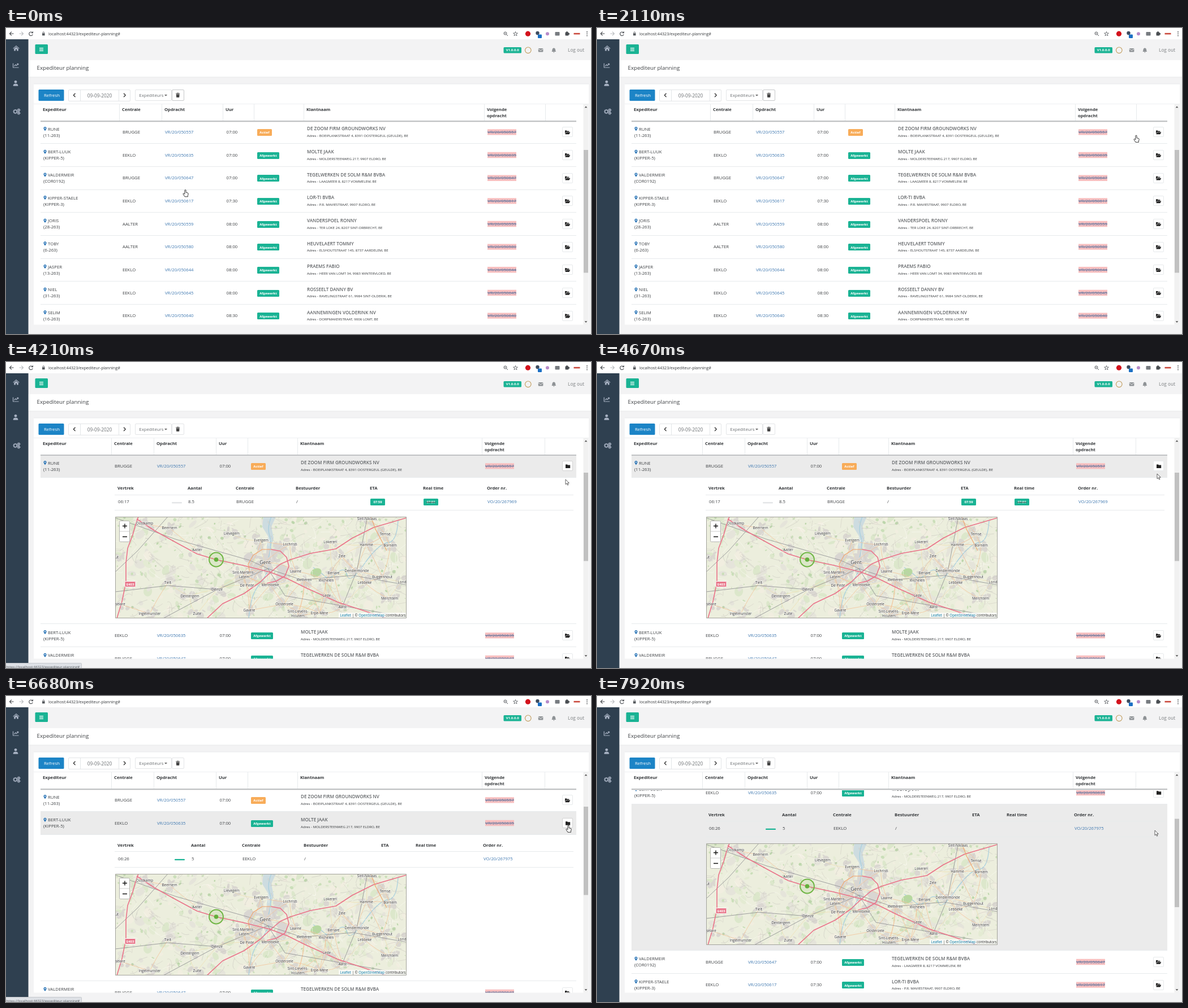
Write an HTML page with a canvas that moves like this. It is 1034x542 px and loops after 8 s.

```html
<!DOCTYPE html>
<html lang="nl">
<head>
<meta charset="utf-8">
<title>Expediteur planning</title>
<style>
html, body { margin: 0; width: 100%; height: 100%; overflow: hidden; background: #f3f3f4; }
canvas { display: block; }
</style>
</head>
<body>
<canvas id="stage" width="1034" height="542"></canvas>
<script>
const LOOP = 8000, PITCH = 40.65, DETAIL = 259.3;
const TEAL = '#1ab394', LINK = '#3f78b0', INK = '#3f4245', LINE = '#e7eaec', HOVER = '#ebebeb';
const stage = document.getElementById('stage').getContext('2d');
let g = stage;

// ---- drawing helpers ----
function rect(x, y, w, h, fill, stroke, r = 0) {
  g.beginPath();
  g.roundRect(x, y, w, h, r);
  if (fill) { g.fillStyle = fill; g.fill(); }
  if (stroke) { g.strokeStyle = stroke; g.lineWidth = 1; g.stroke(); }
}
function circle(x, y, r, fill, stroke, width = 1) {
  g.beginPath();
  g.arc(x, y, r, 0, 7);
  if (fill) { g.fillStyle = fill; g.fill(); }
  if (stroke) { g.strokeStyle = stroke; g.lineWidth = width; g.stroke(); }
}
function shape(d, x, y, fill, stroke, width = 1) {
  const p = new Path2D(d);
  g.save();
  g.translate(x, y);
  g.lineJoin = 'round';
  if (fill) { g.fillStyle = fill; g.fill(p, 'evenodd'); }
  if (stroke) { g.strokeStyle = stroke; g.lineWidth = width; g.stroke(p); }
  g.restore();
}
// cy is the middle of the capitals
function text(s, x, cy, size = 7.75, color = INK, weight = 400, align = 'left') {
  g.font = `${weight} ${size}px "Open Sans", "Noto Sans", sans-serif`;
  g.textAlign = align;
  g.fillStyle = color;
  g.fillText(s, x, cy + size * .357);
  return g.measureText(s).width;
}
function badge(s, x, cy, w, color, struck) {
  rect(x, Math.round(cy - 6), w, 12, color, null, 1.5);
  text(s, x + w / 2, cy + .2, 5.95, '#fff', 700, 'center');
  if (struck) rect(x + 5, Math.round(cy), w - 10, 1, '#2c4a44');
}

// ---- timing helpers ----
const at = (t, keys) => keys.filter(k => k[0] <= t).pop()[1];
// moves: [start, end, steps, points]; each runs in equal steps along its points
function track(t, moves) {
  let pos = moves[0][3][0];
  for (const [start, end, steps, pts] of moves) {
    if (t < start) break;
    const step = steps > 1 ? Math.floor((t - start) / (end - start) * (steps - 1) + .001) + 1 : 1;
    const u = Math.min(1, step / steps) * (pts.length - 1);
    const i = Math.min(pts.length - 2, Math.floor(u));
    pos = pts[i].map((v, n) => v + (pts[i + 1][n] - v) * (u - i));
  }
  return pos;
}

// ---- content ----
const rows = [
  ['RUNE', '11-263', 'BRUGGE', '050557', '07:00', 'DE ZOOM FIRM GROUNDWORKS NV', 'BOEIPLANKSTRAAT 4, 8391 OOSTERGEUL (GEULDE)'],
  ['BERT-LUUK', 'KIPPER-5', 'EEKLO', '050635', '07:00', 'MOLTE JAAK', 'MOLDERSTEENWEG 217, 9907 ELDRO'],
  ['VALDERMEIR', 'COR0192', 'BRUGGE', '050647', '07:00', 'TEGELWERKEN DE SOLM R&M BVBA', 'LAAGMEER 8, 8217 VOMMELEM'],
  ['KIPPER-STAELE', 'KIPPER-3', 'EEKLO', '050617', '07:30', 'LOR-TI BVBA', 'P.R. MAVIESTRAAT, 9907 ELDRO'],
  ['JORIS', '28-263', 'AALTER', '050559', '08:00', 'VANDERSPOEL RONNY', 'TER LOKE 24, 8207 SINT-ORBRECHT'],
  ['TOBY', '6-263', 'AALTER', '050580', '08:00', 'HEUVELAERT TOMMY', 'ELSHOUTSTRAAT 145, 8737 AARDELEM'],
  ['JASPER', '13-263', 'EEKLO', '050644', '08:00', 'PRAEMS FABIO', 'HEER VAN LOMT 34, 9983 WINTERVLOED'],
  ['NIEL', '31-263', 'EEKLO', '050645', '08:00', 'ROSSEELT DANNY BV', 'RAVELINGSTRAAT 61, 9984 SINT-OLDERIK'],
  ['SELIM', '16-263', 'EEKLO', '050640', '08:30', 'AANNEMINGEN VOLDERINK NV', 'DORPMAKERSTRAAT, 9006 LOMT']
];
const heads = ['Expediteur', 'Centrale', 'Opdracht', 'Uur', '', 'Klantnaam', 'Volgende', ''];
const wide = [65, 205, 280, 388, 443, 531, 850, 958];
const narrow = [65, 191, 266, 376, 432, 520, 846, 957];
const detailHeads = ['Vertrek', 'Aantal', 'Centrale', 'Bestuurder', 'ETA', 'Real time', 'Order nr.'];
const details = [
  { x: [197, 321, 406, 512, 643, 737, 850], bar: [293, '#e4e6e8'],
    values: ['06:17', '8.5', 'BRUGGE', '/', '07:59', '07:59', 'VO/20/267969'] },
  { x: [197, 327, 417, 526, 663, 724, 843], bar: [298, TEAL],
    values: ['06:26', '5', 'EEKLO', '/', '', '', 'VO/20/267975'] }
];
const towns = [
  ['Oostkamp', 52, 12], ['Beernem', 96, 20], ['Lievegem', 206, 30], ['Evergem', 258, 42],
  ['Lochristi', 309, 49], ['Lokeren', 380, 45], ['Sint-Niklaas', 445, 4], ['Temse', 477, 31],
  ['Hamme', 444, 50], ['Bornem', 486, 51], ['Aalter', 145, 59], ['Gent', 265, 81],
  ['Zele', 401, 70], ['Dendermonde', 427, 96], ['Sint-Martens-', 227, 99], ['Latem', 228, 107],
  ['Laarne', 319, 97], ['Berlare', 386, 100], ['Wetteren', 334, 112], ['Wichelen', 373, 113],
  ['Lebbeke', 441, 117], ['Buggenhout', 472, 107], ['Tielt', 93, 117], ['Deinze', 180, 129],
  ['De Pinte', 233, 122], ['Merelbeke', 274, 121], ['Dentergem', 132, 141], ['Lede', 374, 140],
  ['Merchtem', 485, 145], ['Oosterzele', 299, 155], ['Gavere', 237, 166], ['Zulte', 145, 172],
  ['Ingelmunster', 61, 172], ['Sint-Lievens-', 323, 168], ['Houtem', 323, 176],
  ['Erpe-Mere', 361, 171], ['Aalst', 402, 160], ['selare', 9, 155], ['ut', 3, 72], ['Lond', 507, 116]
];

function makeMap() {
  const c = document.createElement('canvas');
  c.width = 515; c.height = 180;
  g = c.getContext('2d');
  let seed = 11;
  const rnd = n => (seed = seed * 16807 % 2147483647) / 2147483647 * n;
  const blob = (x, y, r, color) => {
    g.fillStyle = color;
    g.beginPath();
    g.ellipse(x, y, r, r * (.35 + rnd(.6)), rnd(3), 0, 7);
    g.fill();
  };
  rect(0, 0, 515, 180, '#eceedd');
  for (let i = 0; i < 300; i++)
    blob(rnd(515), rnd(180), 2 + rnd(8), ['#e4ebd3', '#f1eee0', '#dce7cb', '#e5e4da'][i % 4]);
  for (let i = 0; i < 220; i++) blob(rnd(515), rnd(180), .8 + rnd(2.4), i % 3 ? '#cbdfba' : '#bdd6ac');
  for (const [, x, y] of towns)
    for (let i = 0; i < 8; i++) blob(x + rnd(26) - 13, y + rnd(18) - 9, 1.5 + rnd(5), '#dad7d1');
  for (let i = 0; i < 34; i++) blob(265 + rnd(60) - 30, 78 + rnd(60) - 30, 3 + rnd(8), '#d9d6d2');
  shape('M262 0h22l-8 18 4 20-6 18h-6l2-22-10-16z', 0, 0, '#cddce0');
  shape('M276 0q-8 20-3 34t-2 38M350 90q12 7 20 15t22-5 18 4 30-20 42-38 18-40M272 90q-8 20-20 34t-16 56',
    0, 0, null, '#a9d0df', 1.3);
  blob(355, 99, 10, '#b7d8a0');
  for (let i = 0; i < 420; i++) {
    const x = rnd(515), y = rnd(180);
    shape(`M${x} ${y}q${rnd(20) - 10} ${rnd(16) - 8} ${rnd(50) - 25} ${rnd(40) - 20}`, 0, 0, null,
      ['#fbfbf5', '#cfcbc2', '#c6c4be'][i % 3], .55);
  }
  towns.forEach(([, x, y], i) => towns.slice(i + 1).forEach(([, u, v]) => {
    if (Math.hypot(u - x, v - y) < 66)
      shape(`M${x} ${y}Q${(x + u) / 2 + rnd(16) - 8} ${(y + v) / 2 + rnd(16) - 8} ${u} ${v}`, 0, 0, null,
        rnd(1) < .55 ? '#f3c49a' : '#efe0b4', .8);
  }));
  shape('M0 2L107 40 237 77 270 92 330 112 420 104 515 121M270 92L180 129 85 180M270 92L300 140 402 158 515 178'
    + 'M93 0L40 60 0 98M0 133L93 122 180 129M402 158L427 96 445 4', 0, 0, null, '#8a8b8e', .8);
  shape('M41 0L36 14 31 32 22 56 19 82 19 116 12 150 3 180M38 4L70 25 108 46 145 66 178 76 225 86 273 98 305 110'
    + ' 337 126 395 152 450 170 480 180M162 180L190 154 228 136 256 116 273 100 292 84 310 76 345 65 390 57 419 38'
    + ' 457 19 515 2M276 58L292 61 303 72 307 88 300 105 285 114 268 118', 0, 0, null, '#ea7389', 1.6);
  shape('M238 100L235 84 244 68 260 58 276 58M452 0L460 22 480 60', 0, 0, null, '#f0a46c', 1.1);
  rect(17, 114.5, 19, 10, '#e8788b', '#fff', 1);
  text('E403', 26.5, 119.5, 6, '#fff', 700, 'center');
  g.strokeStyle = '#ffffffb0';
  g.lineWidth = 1.5;
  for (const [name, x, y] of towns) {
    const size = name === 'Gent' ? 8.6 : 6.3;
    g.font = `400 ${size}px "Open Sans", "Noto Sans", sans-serif`;
    g.textAlign = 'center';
    g.strokeText(name, x, y + size * .357);
    text(name, x, y, size, '#333', 400, 'center');
  }
  circle(178.5, 76, 12.4, '#7fc25026', '#6fb544', 2);
  circle(178.5, 76, 3.8, '#62b03a');
  rect(7.5, 7.5, 18, 37, '#fff', '#b5b5b0', 2);
  rect(8, 25.5, 17, 1, '#ccc');
  shape('M13 16.5h8M17 12.5v8M13 35.5h8', 0, 0, null, '#111', 1.4);
  rect(395, 170, 120, 10, '#ffffffb8');
  let x = 397.5;
  x += text('Leaflet', x, 175, 6.2, '#0078a8');
  x += text(' | © ', x, 175, 6.2, '#333');
  x += text('OpenStreetMap', x, 175, 6.2, '#0078a8');
  text(' contributors', x, 175, 6.2, '#333');
  rect(.5, .5, 514, 179, null, '#a3a39c');
  g = stage;
  return c;
}
const map = makeMap();

// ---- page parts ----
function browserBar() {
  rect(0, 0, 1034, 20, '#fff');
  shape('M7 0H0M3.3-3.3L0 0 3.3 3.3', 6.5, 10, null, '#45494d', 1.1);
  shape('M0 0h7M3.7-3.3L7 0 3.7 3.3', 23.5, 10, null, '#b9bcbf', 1.1);
  shape('M2.5-2.2A3.3 3.3 0 1 0 3.2 1M3.4-4v2.5H.9', 44, 10.3, null, '#45494d', 1.1);
  rect(64, 9.3, 4.6, 4, '#55595d');
  shape('M0 0v-1.4a1.3 1.3 0 0 1 2.6 0V0', 65, 9.5, null, '#55595d', .8);
  text('localhost:44323/expediteur-planning#', 75, 10.4, 7.15, '#35383b');
  circle(882.5, 9.5, 2.5, null, '#55595d');
  shape('M0 0l2.5 2.5M-3-2h2', 884.5, 11.5, null, '#55595d');
  shape('M0-4L1-1.2H4L1.6.6 2.5 3.5 0 1.8-2.5 3.5-1.6.6-4-1.2H-1z', 900.5, 10.3, null, '#55595d', .8);
  circle(922.5, 10.2, 4.6, '#d3121c');
  circle(939.5, 9, 3.2, '#3f4c5e');
  rect(940, 11.5, 7, 6.5, '#1b6fc4', null, 1);
  circle(957, 10.2, 3, '#b78bc9');
  rect(970.5, 7, 8, 6.5, '#777b80', null, 1);
  rect(988.5, 7.5, 6, 6, '#4a4e52', null, 1);
  circle(991.5, 7.4, 1.3, '#4a4e52');
  circle(994.9, 10.4, 1.3, '#4a4e52');
  rect(1003.5, 8.8, 11, 2.6, '#c9483c');
  for (const y of [7, 10.3, 13.6]) circle(1027, y, .9, '#45494d');
}
function sidebar() {
  const c = '#a7b1c2';
  rect(0, 20, 39.5, 522, '#2f4050');
  shape('M0-5L5.8 0 5 .8 0-3.5-5 .8-5.8 0zM-3.8.8L0-2.4 3.8.8V4.5H1V1.7H-1V4.5H-3.8z', 18, 36, c);
  shape('M0 0V7.5H10M2 5L4.3 2.5 6 4 9 1M6.8.8H9.2V3', 12.5, 62.5, null, c, 1.2);
  circle(17, 95.3, 2.4, c);
  shape('M-4.2 4.8V3.3Q-4 .8-1.5.8h3Q4 .8 4.2 3.3V4.8z', 17, 98, c);
  for (const [x, y, r] of [[16.5, 148, 2.6], [22.5, 145.3, 1.4], [22.5, 150.7, 1.4]]) {
    g.setLineDash([1.1, .95]);
    circle(x, y, r + .9, null, c, 1.3);
    g.setLineDash([]);
    circle(x, y, r, null, c, 1.4);
  }
}
function topBar() {
  rect(51.5, 29, 22.5, 17, TEAL, null, 1.5);
  for (const y of [35, 37.4, 39.8]) rect(59, y, 7, 1.1, '#fff');
  rect(879.5, 34, 31.5, 10.5, TEAL, null, 1.5);
  text('V1.0.0.0', 895.2, 39.3, 6, '#fff', 700, 'center');
  circle(922.8, 39.3, 5.3, null, '#c09a58', 1.1);
  rect(940.8, 36, 8.6, 6.6, '#8f9396', null, 1);
  shape('M0 0l4.3 3L8.6 0', 940.8, 37, null, '#f3f3f4', .9);
  shape('M-4 3Q-2.8 2-2.8-.8-2.6-3.5 0-3.8 2.6-3.5 2.8-.8 2.8 2 4 3zM-1.2 3.6h2.4Q1 4.8 0 4.8T-1.2 3.6z', 968.3, 39, '#8f9396');
  text('Log out', 993, 39.2, 8.1, '#999c9e', 600);
  rect(39.5, 57, 995, 30, '#fff');
  rect(39.5, 86.5, 995, 1, LINE);
  text('Expediteur planning', 54.5, 70.5, 9.8, INK);
}
function toolbar(t) {
  const edge = '#e3e5e7', chevron = (d, x) => shape(d, x, 119, null, '#333', 1.3);
  rect(57.5, 109, 45, 20, '#1c84c6', null, 1.5);
  text('Refresh', 81, 119, 7.9, '#fff', 500, 'center');
  rect(110.5, 109.5, 109, 20, '#fff', edge, 1.5);
  rect(131, 109.5, 1, 20, edge);
  rect(199, 109.5, 1, 20, edge);
  chevron('M2-3.2L-1.2 0 2 3.2', 120.5);
  chevron('M-1.5-3.2L1.7 0-1.5 3.2', 209.5);
  text('09-09-2020', 165.5, 120.3, 8.3, '#6c7073', 400, 'center');
  rect(228.5, 109.5, 64, 19, '#fff', edge, 1.5);
  text('Expediteurs', 235.3, 119, 7.8, '#6c7073');
  shape('M0 0h5L2.5 2.7z', 280, 118, '#666');
  rect(293.5, 109.5, 21, 19, '#fff', t < 3140 ? '#c6c8ca' : edge, 1.5);
  shape('M0 .8h2L2.5 0h2L5 .8h2v1H0zM.5 2.5h6L6 8.2H1z', 300.2, 114.7, '#444');
}
function folder(cy, closed, hot) {
  rect(983.5, Math.round(cy) - 8.5, 18, 17, '#fff', hot ? '#d2d2d2' : LINE, 1.5);
  if (closed) shape('M0 .5h3l1 1h4.2V7H0z', 989, cy - 3.4, '#222');
  else shape('M0 0h2.8l1 1h3.6v1.6H2L0 6zM2.3 3.2H9.3L7.4 6.8H.3z', 988, cy - 3, '#222');
}
function drawRow(r, i, cy, cols, s) {
  const [name, code, depot, order, hour, client, address] = r;
  if (s.hover === i && !s.onDetail) rect(61, cy - 20, 947, PITCH, HOVER);
  rect(61, Math.round(cy + 20), 947, 1, LINE);
  shape('M2.5 7.3C.8 5 0 4 0 2.5a2.5 2.5 0 0 1 5 0C5 4 4.2 5 2.5 7.3zM2.5 1.5a1 1 0 1 0 .01 0z', 66.5, cy - 9.3, '#2672b5');
  text(name, 74, cy - 5.4);
  text(`(${code})`, 66, cy + 5.6);
  text(depot, cols[1] + 1, cy);
  text('VR/20/' + order, cols[2] + 1, cy, 7.75, LINK);
  text(hour, cols[3] + 1.5, cy);
  if (i) badge('Afgewerkt', cols[4] + 1, cy + .6, 39, TEAL);
  else badge('Actief', cols[4] + 1, cy + .6, 26, '#f8ac59');
  text(client, cols[5] + 1, cy - 5.8, 8.1, '#606366', 600);
  text(`Adres - ${address}, BE`, cols[5] + 1, cy + 6.3, 6.18, '#333639');
  const x = cols[6] + 1;
  rect(x, cy - 5.2, 51, 10.4, '#f8bfbf');
  text('VR/20/' + order, x + .3, cy, 7.75, '#6f86ac');
  rect(x, cy - .4, 51, 1, '#5a6f98');
  folder(cy, s.open === i, s.status && s.hover === i);
}
function drawDetail(d, cy, lit) {
  if (lit) rect(61, cy + 20, 947, DETAIL, HOVER);
  detailHeads.forEach((h, n) => {
    const x = d.x[n], v = d.values[n], y = cy + 63.3;
    text(h, x, cy + 38.8, 7.7, '#333639', 700);
    if (v && (n === 4 || n === 5)) badge(v, x + 1, y + .3, 26, TEAL, n === 5);
    else text(v, x + 1, y, 7.75, n === 6 ? LINK : INK);
  });
  rect(d.bar[0], cy + 63.6, 18, 2.4, d.bar[1], null, 1);
  for (const y of [50.3, 77.5]) rect(192, Math.round(cy + y), 811, 1, LINE);
  g.drawImage(map, 193, Math.round(cy + 89.6));
  rect(61, Math.round(cy + 19.5 + DETAIL), 947, 1, LINE);
}
function table(s) {
  const cols = s.open < 0 ? wide : narrow;
  g.save();
  g.beginPath();
  g.rect(49, 164, 972, 361.5);
  g.clip();
  rows.forEach((r, i) => {
    const shift = s.open >= 0 && i > s.open ? DETAIL : 0;
    const cy = 184.4 + i * PITCH + shift - s.scroll;
    if (cy > 560) return;
    if (i === s.open) drawDetail(details[i], cy, s.onDetail);
    drawRow(r, i, cy, cols, s);
  });
  g.restore();
  rect(49, 134, 972, 30.5, '#fff');
  rect(49, 134, 981, .8, LINE);
  heads.forEach((h, n) => {
    text(h, cols[n], 144.3, 7.7, '#333639', 700);
    if (n) rect(cols[n] - 5, 135, 1, 30, LINE);
  });
  text('opdracht', cols[6], 155.2, 7.7, '#333639', 700);
  rect(61, 164, 947, 2, '#c0c2c4');
  rect(61, 166, 947, 1, '#ebebeb');
}
function scrollbar(s) {
  rect(1020.5, 134.5, 9, 391, '#f1f1f1');
  if (s.open < 0) rect(1021, 216, 8, 217.5, '#c1c1c1');
  else rect(1021, 196 + s.scroll * .4, 8, 156.5, '#c1c1c1');
  shape('M-2.3 1.2L0-1.4 2.3 1.2z', 1025, 140, '#505050');
  shape('M-2.3-1.2L0 1.4 2.3-1.2z', 1025, 520.5, '#505050');
}
function statusBar() {
  rect(-1, 533.5, 134.5, 10, '#dee1e6', '#c5c8cc', 1);
  text('https://localhost:44323/expediteur-planning#', .5, 540.3, 6.14, '#5a5e63');
}

// ---- motion ----
const pointerMoves = [
  [70, 500, 7, [[317, 286.5], [262, 200], [188, 138]]],
  [640, 1410, 11, [[188, 138], [177, 108], [204, 56], [252, 72], [227, 105]]],
  [1480, 1960, 7, [[227, 105], [886, 186.5]]],
  [2110, 2110, 1, [[886, 186.5], [953, 190]]],
  [2190, 2740, 8, [[953, 190], [1015, 189], [998, 190]]],
  [4130, 4210, 2, [[998, 190], [989, 208]]],
  [4290, 4590, 4, [[989, 208], [987, 221], [990, 203]]],
  [4670, 4670, 1, [[990, 203], [990, 198]]],
  [4750, 4900, 3, [[990, 198], [991, 200]]],
  [5020, 5290, 4, [[991, 200], [992, 190]]],
  [5670, 5900, 4, [[992, 190], [993, 216]]],
  [6060, 6280, 4, [[993, 216], [994, 229]]],
  [7290, 7600, 5, [[994, 229], [985, 244]]],
  [7750, 7920, 3, [[985, 244], [986, 238]]]
];
const scrollMoves = [[7290, 7520, 4, [[0], [24], [42], [51], [54]]]];

function stateAt(t) {
  return {
    open: at(t, [[0, -1], [3580, 0], [5440, -1], [6680, 1]]),
    hover: at(t, [[0, -1], [3140, 0], [5750, 1]]),
    onDetail: at(t, [[0, false], [4290, true], [4590, false], [7600, true]]),
    status: at(t, [[0, false], [3140, true], [4290, false], [5110, true], [6060, false], [6210, true], [7750, false]]),
    hand: at(t, [[0, true], [390, false], [1720, true], [3980, false], [5110, true], [7600, false]]),
    scroll: track(t, scrollMoves)[0]
  };
}
function pointer(t, hand) {
  const [x, y] = track(t, pointerMoves);
  const d = hand
    ? 'M-1.1 1.2a1.1 1.1 0 0 1 2.2 0v3.6l3 .7q1.2.4 1.1 2L4.4 10.2V12.3H-1L-4 7.6q0-1.6 1.5-1l1.4 1.2z'
    : 'M0 0v8.8l2-1.9 1.5 3.2 1.5-.6-1.5-3.2h2.8z';
  shape(d, x, y, '#fff', '#222', hand ? .9 : .7);
}
function frame(now) {
  const t = now % LOOP, s = stateAt(t);
  rect(0, 0, 1034, 542, '#f3f3f4');
  browserBar();
  topBar();
  rect(49, 99, 981, 426.5, '#fff');
  rect(49, 98.5, 981, 1, LINE);
  toolbar(t);
  table(s);
  scrollbar(s);
  sidebar();
  if (s.status) statusBar();
  pointer(t, s.hand);
}
const born = performance.now();
(function loop() {
  frame(performance.now() - born);
  requestAnimationFrame(loop);
})();
</script>
</body>
</html>
```
